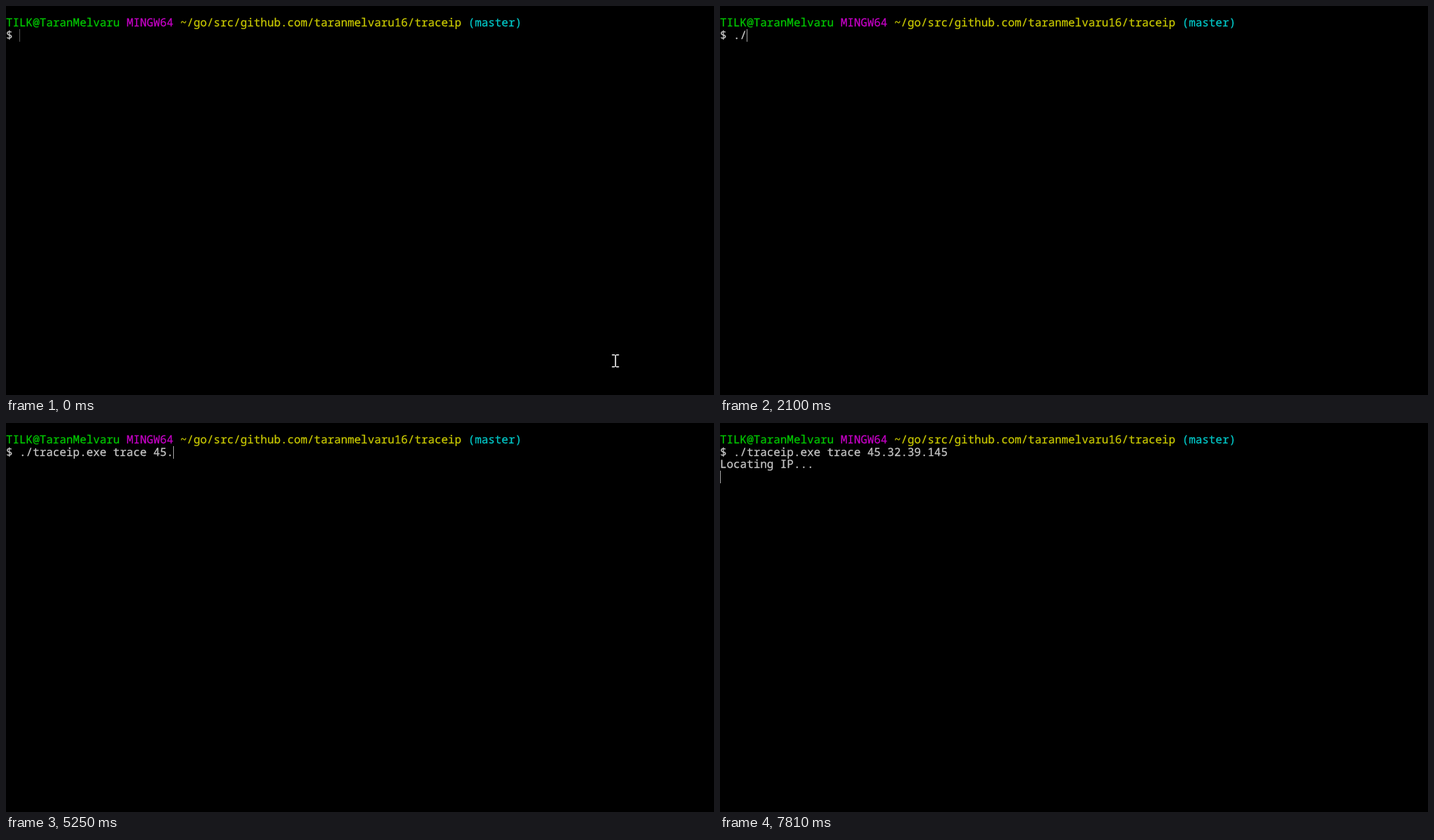
These frames come from a looping animation (1008x555 px, 8 s). An HTML page:

```html
<!DOCTYPE html>
<html lang="en">
<head>
<meta charset="utf-8">
<title>Terminal</title>
<style>
  html, body { margin: 0; width: 100%; height: 100%; overflow: hidden; background: #000; }
  svg { display: block; width: 1008px; height: 555px; }
  text {
    font: 15.9px "Noto Sans Mono", "DejaVu Sans Mono", monospace;
    color: #c8c8c8;
    fill: currentColor;
    stroke: currentColor;
    stroke-width: 0.25px;
    white-space: pre;
    text-rendering: geometricPrecision;
  }
  tspan { fill: currentColor; stroke: currentColor; }
  .user { color: #00c800; }
  .system { color: #c800c8; }
  .path { color: #c8c800; }
  .branch { color: #00c8c8; }
</style>
</head>
<body>
<svg viewBox="0 0 1008 555">
  <text y="29"><tspan class="user">TILK@TaranMelvaru</tspan> <tspan class="system">MINGW64</tspan> <tspan class="path">~/go/src/github.com/taranmelvaru16/traceip</tspan> <tspan class="branch">(master)</tspan></text>
  <text id="command" y="46.7"></text>
  <text id="output" y="64.4"></text>
  <rect id="caret" width="1" height="18"/>
  <path id="pointer" d="M-5 -8.5H-1M1 -8.5H5M0 -8.5V8.5M-5 8.5H-1M1 8.5H5" fill="none" stroke="#fff" stroke-width="1.6"/>
</svg>
<script>
  const LOOP = 8000;
  const CELL = 9.53;
  const COMMAND = './traceip.exe trace 45.32.39.145';
  const DIM = '#555', BRIGHT = '#a4a4a4', OFF = 'none';

  // time, typed characters, caret colour
  const typing = [
    [0, 0, DIM], [910, 0, BRIGHT], [1420, 0, OFF], [1930, 0, BRIGHT],
    [2010, 1, BRIGHT], [2100, 2, BRIGHT], [2490, 3, BRIGHT], [2520, 14, BRIGHT],
    [3030, 14, OFF], [3460, 15, BRIGHT], [3490, 16, BRIGHT], [3640, 17, BRIGHT],
    [3820, 18, BRIGHT], [3930, 19, BRIGHT], [4050, 20, BRIGHT],
    [4510, 21, BRIGHT], [4610, 22, BRIGHT], [5120, 22, OFF], [5250, 23, BRIGHT],
    [5630, 24, BRIGHT], [5720, 25, BRIGHT], [5810, 26, BRIGHT], [6370, 26, OFF],
    [6450, 27, BRIGHT], [6550, 28, BRIGHT], [6930, 29, BRIGHT], [7140, 30, BRIGHT],
    [7470, 31, BRIGHT], [7670, 32, BRIGHT]
  ];
  const ENTER = 7740, REPLY = 7810, POINTER_HIDES = 1650;

  const [command, output, caret, pointer] =
    ['command', 'output', 'caret', 'pointer'].map(id => document.getElementById(id));

  function drawTerminal(t) {
    const [, typed, color] = typing.findLast(([start]) => start <= t);
    const replied = t >= REPLY;
    command.textContent = '$ ' + COMMAND.slice(0, typed);
    output.textContent = replied ? 'Locating IP...' : '';
    caret.setAttribute('x', t >= ENTER ? 0 : Math.round((typed + 2) * CELL));
    caret.setAttribute('y', replied ? 68 : t >= ENTER ? 51 : 33);
    caret.setAttribute('fill', color);
  }

  function drawPointer(t) {
    const step = t < 40 ? 0 : Math.min(5, 1 + Math.floor((t - 40) / 45));
    const left = (1 - step / 5) ** 1.4;
    const nudge = t >= 910 && t < 1010 ? 6 : 0;
    const x = 660.7 + 207 * left + nudge;
    const y = 274.5 + 231.7 * left;
    pointer.setAttribute('transform', `translate(${x} ${y})`);
    pointer.setAttribute('visibility', t < POINTER_HIDES ? 'visible' : 'hidden');
  }

  const begin = performance.now();
  function render(now) {
    const t = Math.max(0, now - begin) % LOOP;
    drawTerminal(t);
    drawPointer(t);
    requestAnimationFrame(render);
  }
  render(begin);
</script>
</body>
</html>
```
